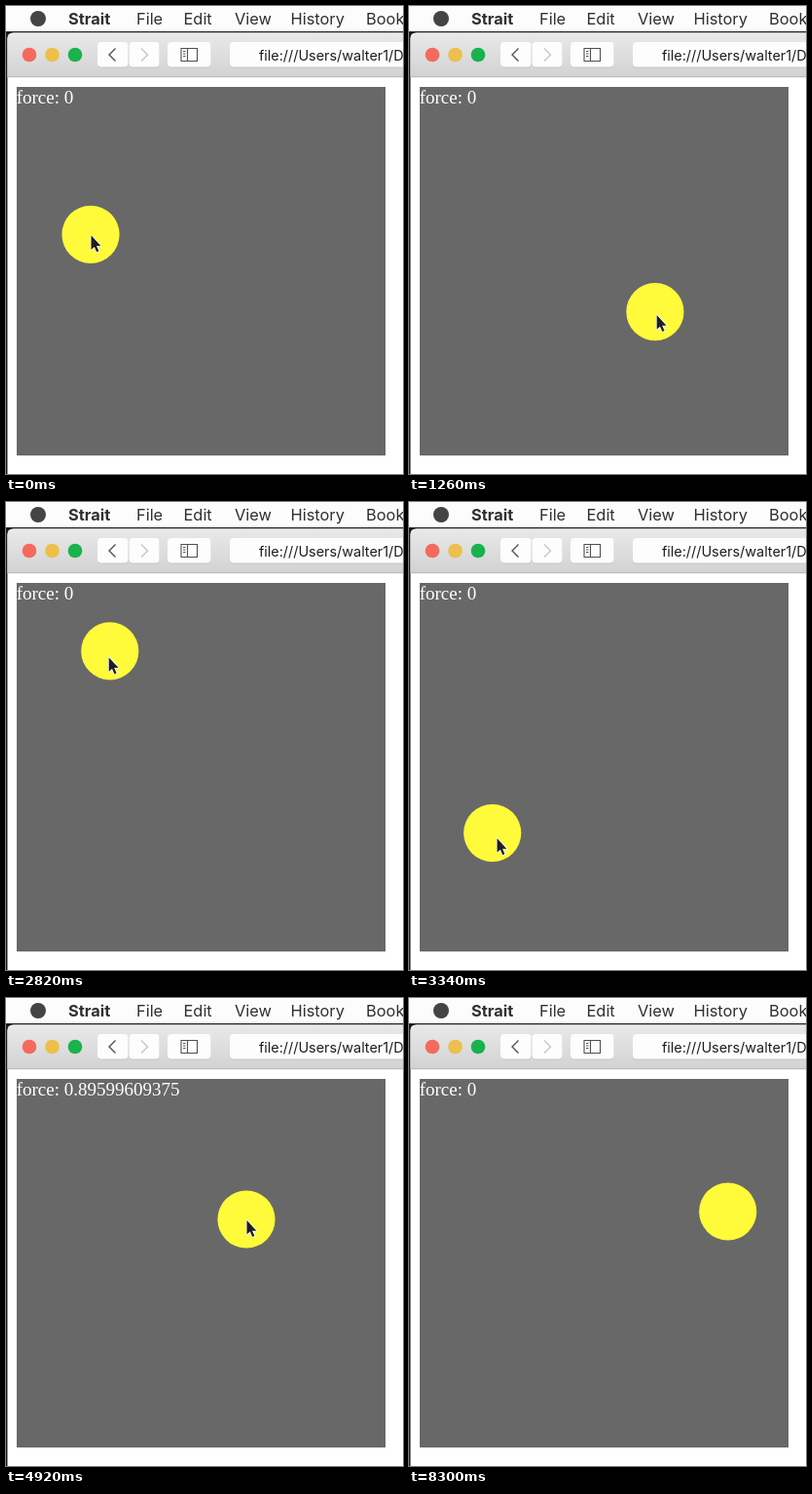
Write an HTML page that moves like this. It is 408 px wide and 480 px high and loops after 8.32 s.

```html
<!DOCTYPE html>
<html lang="en">
<head>
<meta charset="utf-8">
<title>Force drag</title>
<style>
  html, body { margin: 0; width: 100%; height: 100%; overflow: hidden; background: #fff; }
  svg { display: block; width: 408px; height: 480px; }
  .ui { font-family: Inter, "Liberation Sans", sans-serif; }
  .menu { font-size: 16.4px; fill: #303030; }
  .url { font-size: 14.4px; fill: #1e1e1e; }
  #force { font: 19px "Liberation Serif", "Times New Roman", serif; fill: #fff; }
  .icon { fill: none; stroke: #505050; stroke-width: 1.4; }
  .buttons { fill: #fdfdfd; filter: drop-shadow(0 1px 0 #c4c4c4); }
</style>
</head>
<body>
<svg viewBox="0 0 408 480">
  <defs>
    <linearGradient id="bar" x1="0" y1="0" x2="0" y2="1">
      <stop offset="0" stop-color="#e9e9e9"/>
      <stop offset="1" stop-color="#d2d2d2"/>
    </linearGradient>
    <clipPath id="area"><rect x="11" y="83" width="379" height="378"/></clipPath>
  </defs>

  <!-- menu bar -->
  <rect width="408" height="480" fill="#1c1c1c"/>
  <rect width="408" height="26" fill="#fcfcfc"/>
  <circle cx="33" cy="13" r="8" fill="#444"/>
  <g class="ui menu">
    <text x="64" y="19" font-weight="700">Strait</text>
    <text x="134" y="19">File</text>
    <text x="182.5" y="19">Edit</text>
    <text x="235" y="19">View</text>
    <text x="292.5" y="19">History</text>
    <text x="370" y="19">Bookmarks</text>
  </g>

  <!-- window -->
  <path d="M1.5 480V33.5q0-6 6-6H408V480Z" fill="#fff"/>
  <path d="M1.5 73V33.5q0-6 6-6H408V73Z" fill="url(#bar)"/>
  <path d="M1.5 72.7H408" stroke="#b4b4b4"/>
  <circle cx="24" cy="50" r="7.3" fill="#f46a5c"/>
  <circle cx="47.5" cy="50" r="7.3" fill="#edbf4b"/>
  <circle cx="71" cy="50" r="7.3" fill="#18b34c"/>

  <!-- toolbar -->
  <g class="buttons">
    <rect x="94" y="37" width="31.5" height="25.5" rx="4"/>
    <rect x="126.5" y="37" width="31" height="25.5" rx="4"/>
    <rect x="166" y="37" width="44.5" height="25.5" rx="4"/>
    <rect x="230" y="37" width="200" height="25.5" rx="4"/>
  </g>
  <path class="icon" d="M112.5 43.5L106 50l6.5 6.5"/>
  <path class="icon" d="M139 43.5l6.5 6.5-6.5 6.5" style="stroke:#c6c6c6"/>
  <path class="icon" d="M180 43.5h16.5v13H180ZM186.5 43.5v13M182 46.5h2.5M182 49h2.5M182 51.5h2.5" style="stroke-width:1.1"/>
  <text class="ui url" x="260" y="55.5">file:///Users/walter1/Desktop</text>

  <!-- page -->
  <rect x="11" y="83" width="379" height="378" fill="#686868"/>
  <text id="force" x="10.7" y="100">force: 0</text>
  <g clip-path="url(#area)"><circle id="ball" r="29.6" fill="#fffa3a"/></g>
  <path id="arrow" d="M.5 1V15.6L3.8 12.6L6.2 18L8.4 17L6 11.7H10.4Z"
    fill="#1e1e1e" stroke="#fff" stroke-width="1.6" paint-order="stroke" stroke-linejoin="round"/>
</svg>
<script>
const LOOP = 8320, STEP = 20, HIDE = 8260, LEAD = 24;
const PRESS = 4760, PERIOD = 1200, RISE = 200, RELEASE = 600, FALL = 240;

// Where the ball passes; with "until" it rests there.
const stops = [
  { t: 0, until: 580, x: 87, y: 234.3 },
  { t: 840, x: 199.5, y: 258 },
  { t: 1440, until: 1720, x: 258, y: 324 },
  { t: 1880, x: 274.2, y: 206 },
  { t: 2060, x: 262, y: 150 },
  { t: 2520, until: 2720, x: 110, y: 142 },
  { t: 3340, x: 85.7, y: 339.5 },
  { t: 3600, x: 210, y: 325 },
  { t: 3960, x: 356, y: 134 },
  { t: 4060, x: 339.5, y: 147 },
  { t: 4380, until: 8040, x: 247, y: 227 },
  { t: 8300, until: LOOP, x: 327.7, y: 219 }
];

const leave = s => s.until ?? s.t;
const ease = u => {
  u = Math.min(1, Math.max(0, u));
  return u * u * (3 - 2 * u);
};

function slope(i, axis) {
  if (stops[i].until) return 0;
  const a = stops[i - 1], b = stops[i + 1];
  return (b[axis] - a[axis]) / (b.t - leave(a));
}

function along(t, axis) {
  const i = Math.max(1, stops.findIndex(s => t <= leave(s)));
  const a = stops[i - 1], b = stops[i], d = b.t - leave(a);
  const u = Math.min(1, Math.max(0, (t - leave(a)) / d)), v = 1 - u;
  return a[axis] + (b[axis] - a[axis]) * ease(u)
    + d * u * v * (v * slope(i - 1, axis) - u * slope(i, axis));
}

function forceAt(t) {
  if (t < PRESS) return 0;
  const p = (t - PRESS) % PERIOD;
  const f = ease(p / RISE) - ease((p - RELEASE) / FALL);
  return Math.round(f * 4096) / 4096;
}

const [ball, arrow, force] = ["ball", "arrow", "force"].map(id => document.getElementById(id));

function place(el, t) {
  el.setAttribute("transform", `translate(${along(t, "x")} ${along(t, "y")})`);
}

function draw(now) {
  const t = Math.floor((now % LOOP) / STEP) * STEP;
  place(ball, t);
  place(arrow, Math.min(t + LEAD, LOOP)); // the ball trails the pointer
  arrow.setAttribute("visibility", t < HIDE ? "visible" : "hidden");
  force.textContent = "force: " + forceAt(t);
}

const start = performance.now();
function tick() {
  draw(performance.now() - start);
  requestAnimationFrame(tick);
}
tick();
</script>
</body>
</html>
```
